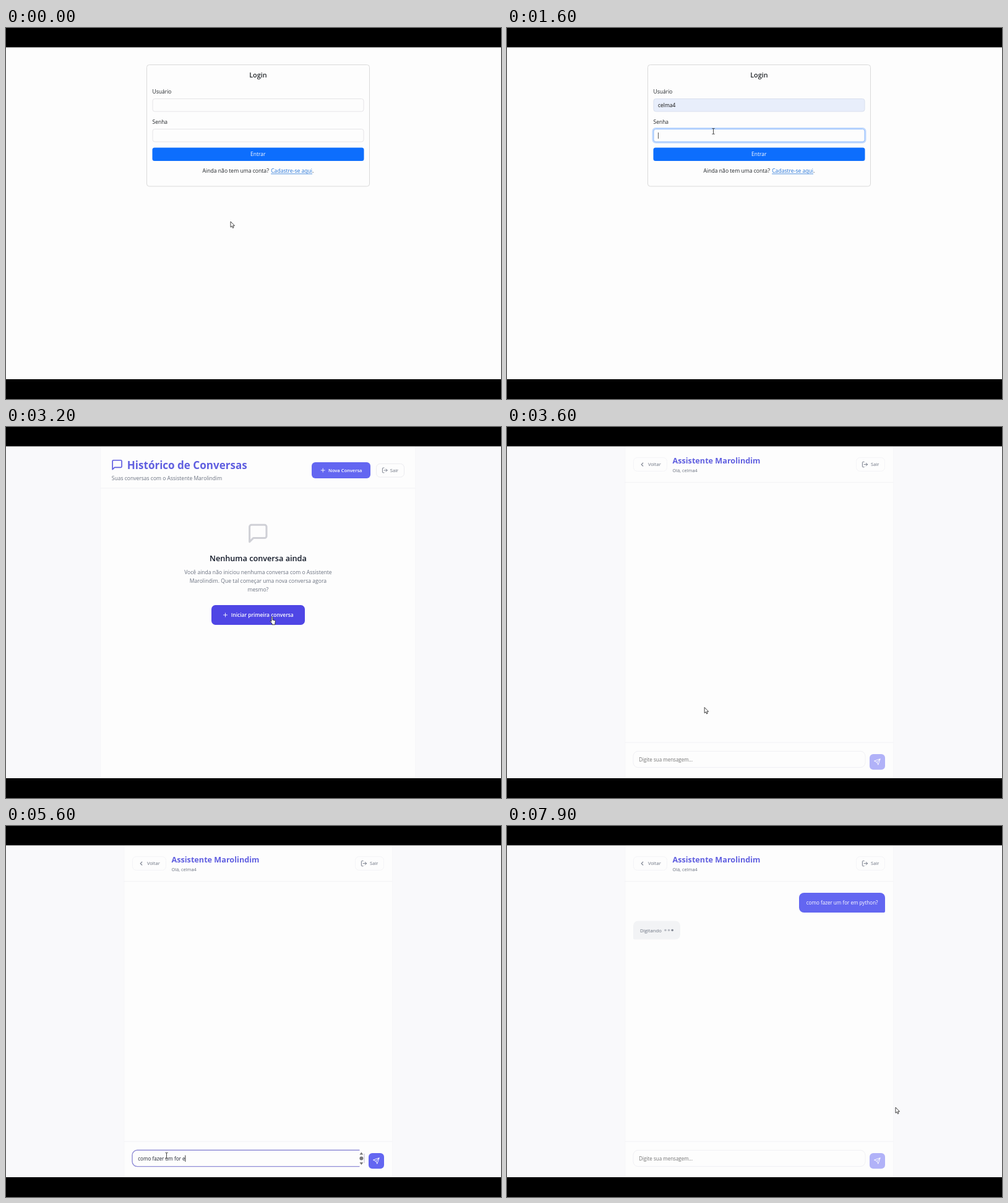
Recreate the animation shown at these times as an HTML page with a canvas. Size 800 by 600 pixels, loop 8000 ms.

```html
<!DOCTYPE html>
<html lang="pt-BR">
<head>
<meta charset="utf-8">
<title>Login e conversa</title>
<style>
html, body { margin: 0; width: 100%; height: 100%; overflow: hidden; background: #000; }
canvas { display: block; width: 800px; height: 600px; }
</style>
</head>
<body>
<canvas id="stage" width="800" height="600"></canvas>
<script>
const ctx = document.getElementById('stage').getContext('2d');
const LOOP = 8000, STEP = 100;
const USER = 'celma4', BOT = 'Assistente Marolindim';
const MESSAGE = 'como fazer um for em python?';
const INDIGO = '#6366f1', GRAY = '#6b7280', PAPER = '#fdfdfd', INK = '#212529';

const AT = {
  focusUser: 500, popup: 600, preview: 800, fill: 1100, focusPass: 1400, passStart: 1600,
  history: 2900, hover: 3100, chat: 3400, focusInput: 3900, sent: 7500
};

// time, x, y of the pointer's hot spot
const POINTER = [
  [0, 363, 313], [500, 312, 124], [600, 312, 124], [900, 333.3, 154.5], [1100, 333.3, 154.5],
  [1300, 333.5, 167], [2700, 333.5, 167], [3100, 429, 307], [3300, 429, 307],
  [3800, 259.5, 533], [6800, 259.5, 533], [7300, 599, 542], [7600, 599, 542], [7900, 628, 455]
];
// time, letters typed
const TYPING = [[4000, 0], [4300, 3], [5600, 19], [6700, 28]];

const ICONS = {
  bubble: 'M21 15a2 2 0 0 1-2 2H7l-4 4V5a2 2 0 0 1 2-2h14a2 2 0 0 1 2 2z',
  exit: 'M9 21H5a2 2 0 0 1-2-2V5a2 2 0 0 1 2-2h4M16 17l5-5-5-5M21 12H9',
  plus: 'M12 5v14M5 12h14',
  back: 'M15 18l-6-6 6-6',
  send: 'M22 2L11 13M22 2l-7 20-4-9-9-4z',
  cross: 'M6 6l12 12M18 6L6 18'
};
for (const name in ICONS) ICONS[name] = new Path2D(ICONS[name]);
const ARROW = new Path2D('M0 0V9.2L2.1 7.3 3.5 10.5 5 9.8 3.7 6.8H6.5Z');
const HAND = new Path2D('M0 .8a1 1 0 0 1 2 0V5l3.2.7q1.2.3 1.1 1.6L5.8 11v1.7H1V11L-2 7.6q-.5-1.2.7-1.2L0 7.4Z');

function track(keys, t, ease = u => u) {
  const last = keys[keys.length - 1];
  if (t <= keys[0][0]) return keys[0].slice(1);
  if (t >= last[0]) return last.slice(1);
  const i = keys.findIndex(k => k[0] > t);
  const a = keys[i - 1], b = keys[i];
  const u = ease((t - a[0]) / (b[0] - a[0]));
  return a.slice(1).map((v, n) => v + (b[n + 1] - v) * u);
}
const smooth = u => u * u * (3 - 2 * u);

function text(str, x, y, size, color, { weight = 400, align = 'left' } = {}) {
  ctx.font = `${weight} ${size}px "Open Sans", "Noto Sans", sans-serif`;
  ctx.textAlign = align;
  ctx.fillStyle = color;
  ctx.fillText(str, x, y);
  return ctx.measureText(str).width;
}

function box(x, y, w, h, r, fill, stroke, line = 1) {
  ctx.beginPath();
  ctx.roundRect(x, y, w, h, r);
  if (fill) { ctx.fillStyle = fill; ctx.fill(); }
  if (stroke) { ctx.strokeStyle = stroke; ctx.lineWidth = line; ctx.stroke(); }
}

function rect(x, y, w, h, color) {
  ctx.fillStyle = color;
  ctx.fillRect(x, y, w, h);
}

function dot(x, y, r, color) {
  ctx.beginPath();
  ctx.arc(x, y, r, 0, Math.PI * 2);
  ctx.fillStyle = color;
  ctx.fill();
}

function icon(name, cx, cy, scale, color, line = 2) {
  ctx.save();
  ctx.translate(cx, cy);
  ctx.scale(scale, scale);
  ctx.translate(-12, -12);
  ctx.lineWidth = line;
  ctx.lineCap = ctx.lineJoin = 'round';
  ctx.strokeStyle = color;
  ctx.stroke(ICONS[name]);
  ctx.restore();
}

function field(y, focused, fill) {
  if (focused) box(235.7, y - 0.8, 343.6, 23.1, 4.5, null, '#c2dafe', 2.4);
  box(237, y + 0.5, 341, 20.5, 3.5, fill, focused ? '#86b7fe' : fill === PAPER ? '#e3e1e5' : '#d6ddec', 0.9);
}

function popup() {
  ctx.beginPath();
  ctx.moveTo(298, 142);
  ctx.lineTo(304.5, 136.5);
  ctx.lineTo(311, 142);
  ctx.fillStyle = '#1d1d1d';
  ctx.fill();
  box(293.5, 141.5, 87, 23.5, 3, '#333', '#1d1d1d', 1.4);
  text(USER, 299.3, 155.8, 7.1, '#f4f4f4', { weight: 600 });
  icon('cross', 368.5, 153, 0.4, '#ddd', 2.4);
}

function login(t) {
  const filled = t >= AT.fill, preview = t >= AT.preview;
  const passFocus = t >= AT.focusPass;
  box(227.5, 59.5, 360, 196.5, 4, null, '#dadada');
  text('Login', 407.4, 80, 10.8, INK, { weight: 600, align: 'center' });
  text('Usuário', 236.5, 106, 8.5, INK);
  text('Senha', 236.5, 154.8, 8.5, INK);
  field(114, t >= AT.focusUser && !passFocus, preview ? '#e8eefb' : PAPER);
  field(163, passFocus, PAPER);

  if (filled) text(USER, 244, 128.2, 8.45, '#111');
  else if (preview) text(USER, 244, 128, 7.1, '#111', { weight: 500 });
  else if (t >= AT.focusUser) rect(244, 120, 0.8, 10, '#333');

  const count = Math.max(0, Math.min(9, Math.round((t - AT.passStart) / 100)));
  for (let i = 0; i < count; i++) dot(246.2 + i * 3.68, 174, 1.25, '#16181b');
  if (passFocus && !count) rect(244, 169, 0.8, 10, '#333');

  box(236.5, 193.5, 342, 21.5, 3.5, '#0d6efd');
  text('Entrar', 407.3, 207.4, 8.5, '#fff', { align: 'center' });
  text('Ainda não tem uma conta?', 317.6, 234.2, 8.62, INK);
  const w = text('Cadastre-se aqui', 428.2, 234.2, 8.58, '#2474d8');
  rect(428.2, 235.5, w, 0.8, '#2474d8');
  text('.', 428.2 + w, 234.2, 8.6, INK);
  if (t >= AT.popup && !filled) popup();
}

function panel(x, w, headerY) {
  rect(0, 31, 800, 537, '#f9f9fb');
  rect(x, 31, w, 537, PAPER);
  rect(x, 31, 0.7, 537, '#f3f3f6');
  rect(x + w, 31, 0.7, 537, '#f5f5f8');
  rect(x, headerY, w, 1, '#f2f2f5');
}

function history(t) {
  panel(152.5, 509, 98.5);
  icon('bubble', 179.6, 61.2, 0.83, '#5f5ce0');
  text('Histórico de Conversas', 195.8, 67.9, 17.05, '#605fe0', { weight: 700 });
  text(`Suas conversas com o ${BOT}`, 170.8, 86, 8.54, GRAY);
  box(494, 57, 95, 26, 6, INDIGO);
  icon('plus', 512.2, 70, 0.43, '#fff');
  text('Nova Conversa', 521, 72.9, 7.53, '#fff', { weight: 600 });
  box(598.5, 59.5, 45, 21.5, 6, null, '#ececf0');
  icon('exit', 612.3, 70, 0.43, GRAY);
  text('Sair', 620.8, 72.9, 7.6, GRAY);

  icon('bubble', 407.3, 172, 1.52, '#cfd0d6');
  const mid = { align: 'center' };
  text('Nenhuma conversa ainda', 407.4, 216.9, 12.7, '#111827', { weight: 600, align: 'center' });
  text('Você ainda não iniciou nenhuma conversa com o Assistente', 407.4, 237.5, 8.59, GRAY, mid);
  text(`${BOT.split(' ')[1]}. Que tal começar uma nova conversa agora`, 407.4, 252, 8.59, GRAY, mid);
  text('mesmo?', 407.4, 266.4, 8.59, GRAY, mid);
  box(332, 288, 151, 32, 6.5, t >= AT.hover ? '#4f46e5' : INDIGO);
  icon('plus', 354.5, 304, 0.43, '#fff');
  text('Iniciar primeira conversa', 363.8, 307.2, 8.42, '#fff', { weight: 600 });
}

function scrollbar() {
  rect(571.5, 523, 9, 29, PAPER);
  ctx.fillStyle = '#777';
  for (const [base, tip] of [[531.5, 527.5], [544, 548]]) {
    ctx.beginPath();
    ctx.moveTo(571.5, base);
    ctx.lineTo(577.2, base);
    ctx.lineTo(574.4, tip);
    ctx.fill();
  }
  dot(574.4, 537.6, 3, '#777');
  rect(578.6, 530, 0.8, 15, '#aaa8c8');
}

function chat(t) {
  const sent = t >= AT.sent;
  const focused = t >= AT.focusInput && !sent;
  const typed = sent ? '' : MESSAGE.slice(0, Math.round(track(TYPING, t)[0]));
  panel(190.5, 433.5, 89.2);
  box(204.5, 49.5, 54, 22, 6, null, '#f4f4f7');
  icon('back', 218.5, 60.6, 0.43, GRAY, 2.4);
  text('Voltar', 227.9, 63.4, 7.6, GRAY);
  text(BOT, 267.5, 59, 12.63, '#605fe0', { weight: 700 });
  text(`Olá, ${USER}`, 267.5, 73, 7.4, GRAY);
  box(564.5, 49.5, 46, 22, 6, null, '#f4f4f7');
  icon('exit', 578.5, 60.6, 0.46, GRAY);
  text('Sair', 588, 63.4, 7.6, GRAY);

  if (sent) {
    box(472, 108, 139, 32, [8, 8, 2, 8], INDIGO);
    text(MESSAGE, 483.7, 127.4, 8.08, '#fff');
    box(204, 153.5, 76, 30, [8, 8, 8, 2], '#f2f3f5');
    text('Digitando', 215, 171.9, 7.74, GRAY);
    const active = Math.floor((t - AT.sent) / 200) % 3;
    for (let i = 0; i < 3; i++) dot(256 + i * 5.6, 168.5, 1.8, i === active ? '#868b96' : '#b9bcc4');
  }

  rect(190.5, 509.7, 433.5, 1, '#f2f2f5');
  box(204, 524.3, 375, 26.3, 8, PAPER, focused ? '#908dd6' : '#f0f0f4', focused ? 1.4 : 1);
  if (typed) scrollbar();
  if (!typed) text('Digite sua mensagem...', 213.2, 540.8, 8.03, '#757575');
  const w = typed ? text(typed, 213.2, 540.8, 8.08, '#1f2430') : 0;
  if (focused) rect(213.2 + w, 532.5, 0.8, 10.5, '#111');

  box(586, 529, 25, 25.3, 6, typed ? INDIGO : '#b1b2f8');
  icon('send', 598.4, 541.7, 0.46, '#fff');
}

function pointerKind(t) {
  if (t < 400) return 'arrow';
  if (t < 700) return 'beam';
  if (t < 1200) return 'arrow';
  if (t < AT.history) return 'beam';
  if (t < AT.hover) return 'arrow';
  if (t < AT.chat) return 'hand';
  if (t < 3800) return 'arrow';
  if (t < 6900) return 'beam';
  if (t < 7200) return 'arrow';
  return t < AT.sent ? 'hand' : 'arrow';
}

function pointer(t) {
  const [x, y] = track(POINTER, t, smooth);
  const kind = pointerKind(t);
  ctx.save();
  ctx.translate(x, y);
  ctx.lineJoin = 'round';
  if (kind === 'beam') {
    rect(-0.4, -4.5, 0.9, 9, '#333');
    for (const end of [-5, 4.2]) rect(-2.2, end, 4.5, 0.8, '#444');
  } else {
    const shape = kind === 'hand' ? HAND : ARROW;
    ctx.fillStyle = '#fff';
    ctx.strokeStyle = '#222';
    ctx.lineWidth = 0.85;
    ctx.fill(shape);
    ctx.stroke(shape);
  }
  ctx.restore();
}

function draw(t) {
  rect(0, 0, 800, 600, PAPER);
  if (t < AT.history) login(t);
  else if (t < AT.chat) history(t);
  else chat(t);
  pointer(t);
  rect(0, 0, 800, 31.3, '#000');
  rect(0, 568, 800, 32, '#000');
}

const start = performance.now();
function tick() {
  const t = (performance.now() - start) % LOOP;
  draw(Math.floor(t / STEP) * STEP);
  requestAnimationFrame(tick);
}
tick();
</script>
</body>
</html>
```
